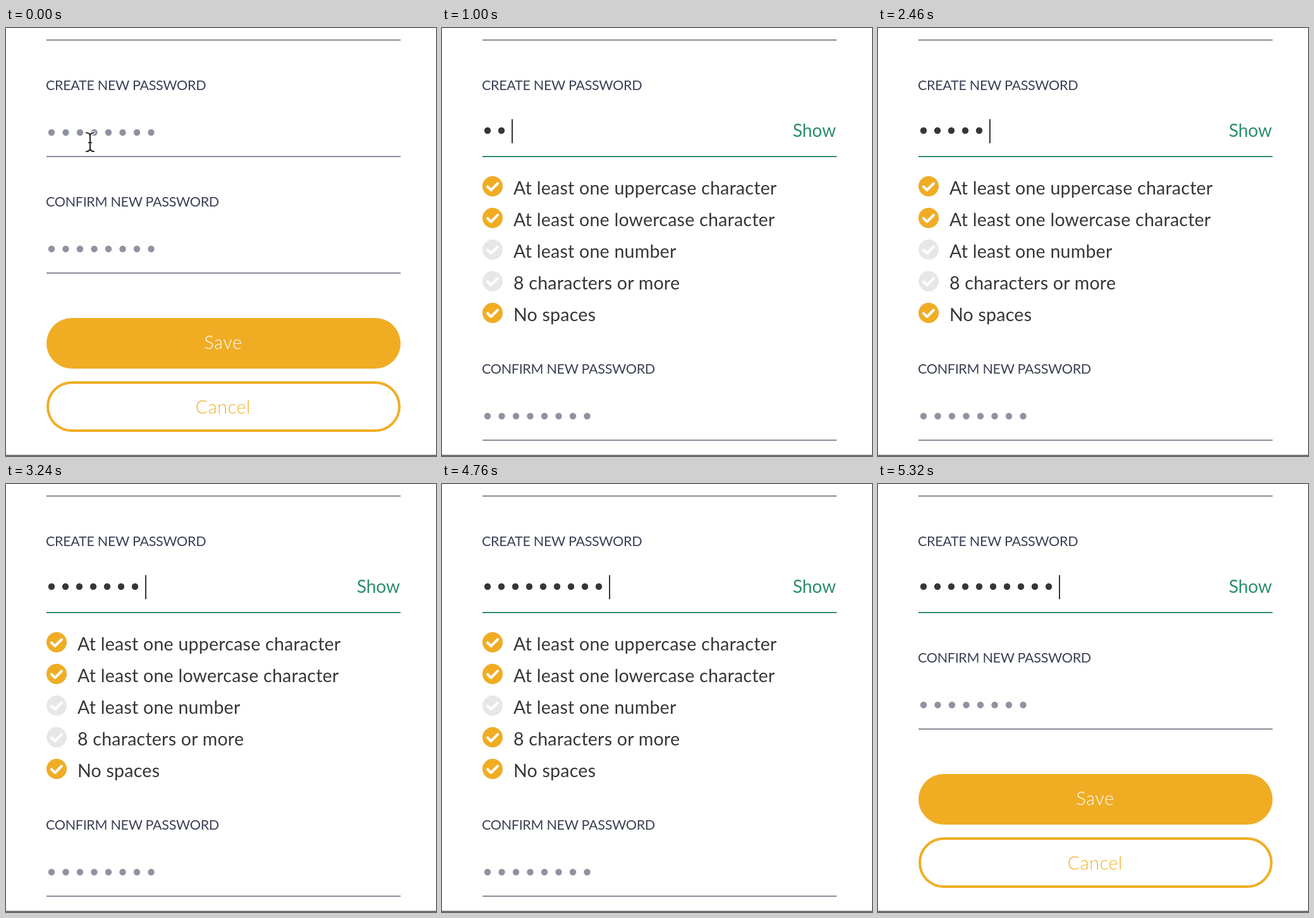
Animation, 680 px wide and 676 px high, one loop 5.34 s. Source, as an HTML page:

```html
<!DOCTYPE html>
<html lang="en">
<head>
<meta charset="utf-8">
<title>Password form</title>
<style>
  html, body { margin: 0; width: 100%; height: 100%; overflow: hidden; background: #fff; }
  svg { display: block; width: 680px; height: 676px; }
  text { font-family: Lato, "Open Sans", sans-serif; }
  .label { font-size: 21.5px; letter-spacing: -.3px; fill: #3b4054; }
  .rule { font-size: 28.5px; letter-spacing: .25px; fill: #363636; }
  .show { font-size: 28px; fill: #2d8d6a; text-anchor: end; }
  .button { font-size: 28.5px; font-weight: 300; letter-spacing: .7px; text-anchor: middle; }
  .line { fill: #8d8d9a; }
  .hint { fill: #8f93a0; }
  .typed { fill: #363636; }
  .cover { fill: #fff; }
  .check { fill: none; stroke: #fff; stroke-width: 4; stroke-linecap: round; stroke-linejoin: round; }
  .beam { fill: none; stroke-linecap: round; }
</style>
</head>
<body>
<svg viewBox="0 0 680 676">
  <rect class="line" x="64" y="18" width="560" height="2"/>
  <text class="label" x="63" y="98">CREATE NEW PASSWORD</text>
  <g id="idle"></g>
  <g id="closed"></g>
  <rect x="64" y="458" width="560" height="80" rx="40" fill="#f0ad24"/>
  <text class="button" x="343.5" y="506.500" fill="#fff">Save</text>
  <rect x="66" y="560" width="556" height="76" rx="38" fill="#fff" stroke="#f0ad24" stroke-width="4"/>
  <text class="button" x="343.5" y="608.5" fill="#f0ad24">Cancel</text>

  <g id="active">
    <rect class="cover" x="60" y="130" width="570" height="76"/>
    <rect x="64" y="202" width="560" height="2" fill="#2d8d6a"/>
    <g id="dots"></g>
    <rect id="caret" class="typed" y="144" width="2" height="38"/>
    <text id="show" class="show" x="623" y="172">Show</text>
  </g>

  <g id="panel">
    <rect class="cover" x="60" y="212" width="570" height="460"/>
    <g id="rules"></g>
    <g id="opened"></g>
  </g>

  <g id="cursor">
    <path id="beamHalo" class="beam" stroke="#fff" stroke-width="4.5"/>
    <path id="beamInk" class="beam" stroke="#2b2b2b" stroke-width="2.2"/>
  </g>
  <rect y="674" width="680" height="2" fill="#77757c"/>
</svg>
<script>
const LOOP = 5340;
const KEYS = [0, 820, 1560, 2020, 2320, 2720, 3240, 4200, 4540, 4860];
const RULES = [
  ["At least one uppercase character", 320],
  ["At least one lowercase character", 820],
  ["At least one number", 4860],
  ["8 characters or more", 4200],
  ["No spaces", 320]
];
const $ = id => document.getElementById(id);
const range = n => [...Array(n).keys()];

const dot = (x, y, kind) => `<circle class="${kind}" cx="${x}" cy="${y}" r="5.2"/>`;
const hints = y => range(8).map(i => dot(72 + 22.5 * i, y, "hint")).join("");
const underline = y => `<rect class="line" x="64" y="${y}" width="560" height="2"/>`;
const confirmField = y =>
  `<text class="label" x="63" y="${y}">CONFIRM NEW PASSWORD</text>${hints(y + 67)}${underline(y + 104)}`;

const rule = ([label], i) => `<g transform="translate(0 ${50 * i})">
  <circle cx="80" cy="250" r="16" fill="#e7e7e7"/>
  <circle class="lit" cx="80" cy="250" r="16" fill="#f0ad24"/>
  <path class="check" d="M72 250.5l5.500 5.500L88 245.500"/>
  <text class="rule" x="113" y="263">${label}</text></g>`;

$("idle").innerHTML = hints(165) + underline(202);
$("closed").innerHTML = confirmField(282);
$("opened").innerHTML = confirmField(546);
$("rules").innerHTML = RULES.map(rule).join("");
$("dots").innerHTML = range(10).map(i => dot(72 + 22 * i, 162, "typed")).join("");

const beam = "M127 165.500Q133 165.500 133 171V189.500Q133 195 127 195" +
  "M139 165.500Q133 165.500 133 171M133 189.500Q133 195 139 195M131 181H135";
$("beamHalo").setAttribute("d", beam);
$("beamInk").setAttribute("d", beam);

const dots = [...$("dots").children];
const lit = [...document.querySelectorAll(".lit")];

// Eased 0..1 progress that begins at start and takes span ms
const fade = (t, start, span) => {
  const p = Math.min(1, Math.max(0, (t - start) / span));
  return 1 - (1 - p) ** 2;
};
const setOpacity = (el, v) => el.setAttribute("opacity", v);

function draw(t) {
  const open = fade(t, 10, 250);
  const close = fade(t, 5040, 230);
  const count = KEYS.filter(k => t >= k).length;

  setOpacity($("active"), open);
  setOpacity($("panel"), open * (1 - close));
  setOpacity($("cursor"), 1 - open);
  setOpacity($("show"), fade(t, 310, 200));
  dots.forEach((d, i) => setOpacity(d, i < count ? 1 : 0));
  $("caret").setAttribute("x", 66 + 22 * count);
  RULES.forEach(([, start], i) => setOpacity(lit[i], fade(t, start, 180)));
}

const begin = performance.now();
function tick() {
  draw((performance.now() - begin) % LOOP);
  requestAnimationFrame(tick);
}
draw(0);
requestAnimationFrame(tick);
</script>
</body>
</html>
```
